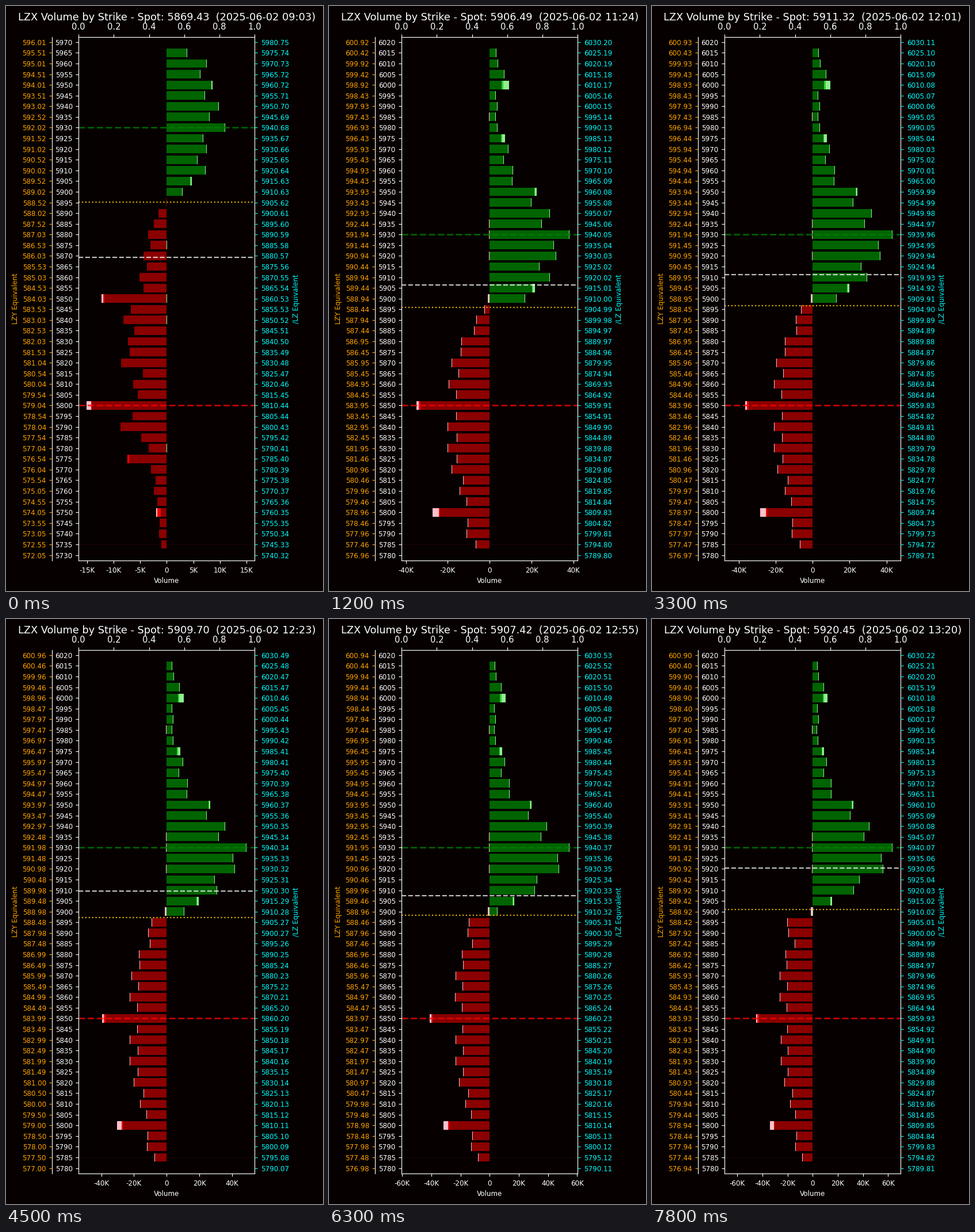
A matplotlib script for the animation above (8 s loop, 551 px wide and 1017 px high).

```python
import matplotlib.pyplot as plt
import numpy as np
from matplotlib.animation import FuncAnimation

W, H = 551, 1017
PT = 1.067                       # point scale at 100 dpi
L, R, TOP, BOT = 126.2, 432.4, 53.6, 963.8
MID = (L + R) / 2                # zero line
FULL = (R - L) / 2.2             # length of the longest bar
SIDE = L - 0.15 * (R - L)        # outer left scale
PAD = 7 * PT * 100 / 72          # tick plus gap before its label
ROWS = 49
PITCH = (BOT - TOP) / ROWS
YS = TOP + PITCH * (np.arange(ROWS) + 0.5)
ORANGE, CYAN, BACK = "orange", "cyan", "#060000"
UP = ("darkgreen", "limegreen", "lightgreen")
DOWN = ("darkred", "red", "pink")
GAP = 2                          # first step after the break in the session

# step, minute, spot, peak volume (K), price ratios of the side scales
KEYS = np.array([
    (0, 543, 5869.43, 15.06, .09983425, 1.00180085),
    (4, 684, 5906.49, 38.2, .0998207, 1.00169475),
    (8, 705, 5902.14, 40.2, .0998223, 1.0016705),
    (11, 721, 5911.32, 43.4, .09982205, 1.0016798),
    (15, 743, 5909.70, 49, .0998274, 1.0017429),
    (21, 775, 5907.42, 55, .09982359, 1.0017486),
    (26, 800, 5920.45, 63.7, .09981695, 1.0016975)])

# Outline of net volume by strike, relative to the peak
EARLY = [(5735, -10), (5780, -28), (5790, -72), (5800, -62), (5815, -47),
         (5822, -80), (5830, -60), (5845, -71), (5855, -46), (5885, -25),
         (5895, -1), (5900, 25), (5907, 60), (5920, 62), (5932, 88),
         (5960, 62), (5965, 40)]
LATE = [(5785, -28), (5795, -43), (5810, -47), (5825, -65), (5855, -66),
        (5875, -57), (5885, -31), (5895, -10), (5900, 55), (5905, 89),
        (5920, 103), (5925, 127), (5935, 103), (5950, 73), (5955, 45),
        (5965, 28), (5975, 30), (5980, 12), (6015, 13)]
SPIKES = {6005: 2.3, 6000: 2.4, 5930: 1.08, 5850: 1.72, 5800: 2, 5775: 3}
# Light and bright widths at the bar ends
TIPS = {6000: (10, 3), 5975: (5, 2), 5950: (3, 1), 5905: (4, 1),
        5850: (3.5, 3.5), 5800: (11.5, 2), 5775: (0, 6), 5750: (2, 9)}
EARLY_STUBS = {5875: 1, 5850: 1, 5840: 1, 5780: 1}
LATE_STUBS = {5985: 1, 5935: 1, 5930: 1, 5920: 1, 5900: 3}

fig = plt.figure(figsize=(W / 100, H / 100), dpi=100, facecolor=BACK)
ax = fig.add_axes([0, 0, 1, 1])
ax.set_xlim(0, W)
ax.set_ylim(H, 0)
ax.axis("off")


def label(x, y, s, color="white", size=8, ha="center", va="baseline", **kw):
    return ax.text(x, y, s, color=color, fontsize=size * PT, ha=ha, va=va,
                   fontfamily="DejaVu Sans", **kw)


def line(xs, ys, color="white", lw=0.8, **kw):
    return ax.plot(xs, ys, color=color, lw=lw * PT, **kw)[0]


def level_line(color, lw, ls, alpha=1):
    return line([L, R], [0, 0], color, lw, ls=ls, alpha=alpha)


def ticks(xs, ys, marker, color="white"):
    return ax.plot(xs, ys, ls="none", marker=marker, ms=3.5 * PT,
                   mew=0.8 * PT, color=color, zorder=3)[0]


def column(x, ha, color):
    return [label(x, y, "", color, ha=ha, va="center_baseline") for y in YS]


# Frame, side scales and fixed text
for x in (SIDE, L, R):
    line([x, x], [TOP, BOT], zorder=3)
for y in (TOP, BOT):
    line([L, R], [y, y], zorder=3, solid_capstyle="projecting")
line([L, R], [YS[47]] * 2, "#1b0505", zorder=0.5)
for x, mark, color in ((SIDE, 0, ORANGE), (L, 0, "white"), (R, 1, CYAN)):
    ticks([x] * ROWS, YS, mark, color)
tops = np.linspace(L, R, 6)
ticks(tops, [TOP] * 6, 2)
for i, x in enumerate(tops):
    label(x, 40.6, f"{i / 5:.1f}", size=10)
middle = (TOP + BOT) / 2
label(16.2, middle, "LZY Equivalent", ORANGE, va="center", rotation=90)
label(504.4, middle, "/LZ Equivalent", CYAN, va="center", rotation=90)
label(MID, 1003.3, "Volume")

title = label(MID, 25, "", size=12)
left = column(SIDE - PAD, "right", ORANGE)
strike_text = column(L - PAD, "right", "white")
right = column(R + PAD, "left", CYAN)
x_ticks = ticks([], [], 3)
x_text = [label(0, 985, "") for _ in range(7)]

layers = [ax.barh(YS[1:-1], [0] * 47, height=PITCH * 0.8, lw=0, zorder=1)
          for _ in range(4)]
call_line = level_line("green", 2, "--", 0.7)
put_line = level_line("red", 2, "--", 0.7)
spot_line = level_line("white", 1.5, "--", 0.75)
flip_line = level_line("#dcae00", 1.5, ":")


def bell(x, center, width):
    return np.exp(-((x - center) / width) ** 2)


def quotes(step):
    """Minute, spot, peak and ratios, linear between the key rows."""
    if step < GAP:
        return KEYS[0, 1:] + step * np.array([5, 1.2, 0.5, 0, 0])
    i = min(max(np.searchsorted(KEYS[:, 0], step, "right") - 1, 1), 5)
    a, b = KEYS[i], KEYS[i + 1]
    return (a + (b - a) * (step - a[0]) / (b[0] - a[0]))[1:]


def net_volume(strikes, step, u):
    """Bar lengths; u runs from 0 to 1 over the later part of the day."""
    v = np.interp(strikes, *zip(*(EARLY if step < GAP else LATE)))
    if step >= GAP:
        end = v * (0.75 + 0.4 * bell(strikes, 5910, 35))
        end -= 66 * bell(strikes, 5903, 11)
        v = v + u * (end - v)
    v *= np.where(strikes % 10 == 0, 1.12, 0.88)
    v *= [SPIKES.get(k, 1) for k in strikes]
    return np.clip(v, -139, 139) * FULL / 139


def place(rect, a, b, color):
    rect.set_visible(a != b)
    rect.set_x(MID + min(a, b))
    rect.set_width(abs(b - a))
    rect.set_facecolor(color)


def draw_bars(strikes, bars, step, peak):
    early = step < GAP
    stubs = EARLY_STUBS if early else LATE_STUBS
    scale = 0.65 if early else 38.2 / peak
    for i, (strike, v) in enumerate(zip(strikes, bars)):
        sign, size = np.sign(v), abs(v)
        colors, other = (UP, DOWN) if v > 0 else (DOWN, UP)
        thin = 0 if early and v < 0 else 1
        light, bright = TIPS.get(strike, (thin / scale, 0))
        b = max(size - light * scale, 0)
        a = max(b - bright * scale, 0)
        edges = (0, a, b, size)
        for k in range(3):
            place(layers[k][i], sign * edges[k], sign * edges[k + 1],
                  colors[k])
        place(layers[3][i], 0, -sign * stubs.get(strike, 0), other[2])


def draw_scale(peak):
    gap = 5 if peak < 20 else 20
    n = int(peak * 1.1 // gap)
    vols = np.arange(-n, n + 1) * gap
    xs = MID + vols * FULL / peak
    x_ticks.set_data(xs, [BOT] * len(xs))
    for i, t in enumerate(x_text):
        t.set_visible(i < len(xs))
        if i < len(xs):
            t.set_x(xs[i])
            t.set_text(f"{vols[i]}K" if vols[i] else "0")


def draw(frame):
    step = frame // 3
    minute, spot, peak, ratio_a, ratio_b = quotes(step)
    u = (minute - 684) / 116
    flip = 5895.2 if step < GAP else 5895.9 + 2.4 * u + 2.7 * u ** 6
    top = 50 * round(spot / 50) + 120
    strikes = top - 5 * np.arange(ROWS)
    inner = strikes[1:-1]
    bars = net_volume(inner, step, u)

    h, m = divmod(int(minute), 60)
    title.set_text(f"LZX Volume by Strike - Spot: {spot:.2f}  "
                   f"(2025-06-02 {h:02d}:{m:02d})")
    for i, k in enumerate(strikes):
        left[i].set_text(f"{k * ratio_a:.2f}")
        strike_text[i].set_text(str(k))
        right[i].set_text(f"{k * ratio_b:.2f}")
    draw_bars(inner, bars, step, peak)
    draw_scale(peak)
    for mark, price in ((call_line, inner[bars.argmax()]),
                        (put_line, inner[bars.argmin()]),
                        (spot_line, spot), (flip_line, flip)):
        mark.set_ydata([YS[0] + (top - price) / 5 * PITCH] * 2)
    return []


anim = FuncAnimation(fig, draw, frames=80, interval=100,
                     init_func=lambda: draw(0), repeat=True, repeat_delay=0)
plt.show()
```
